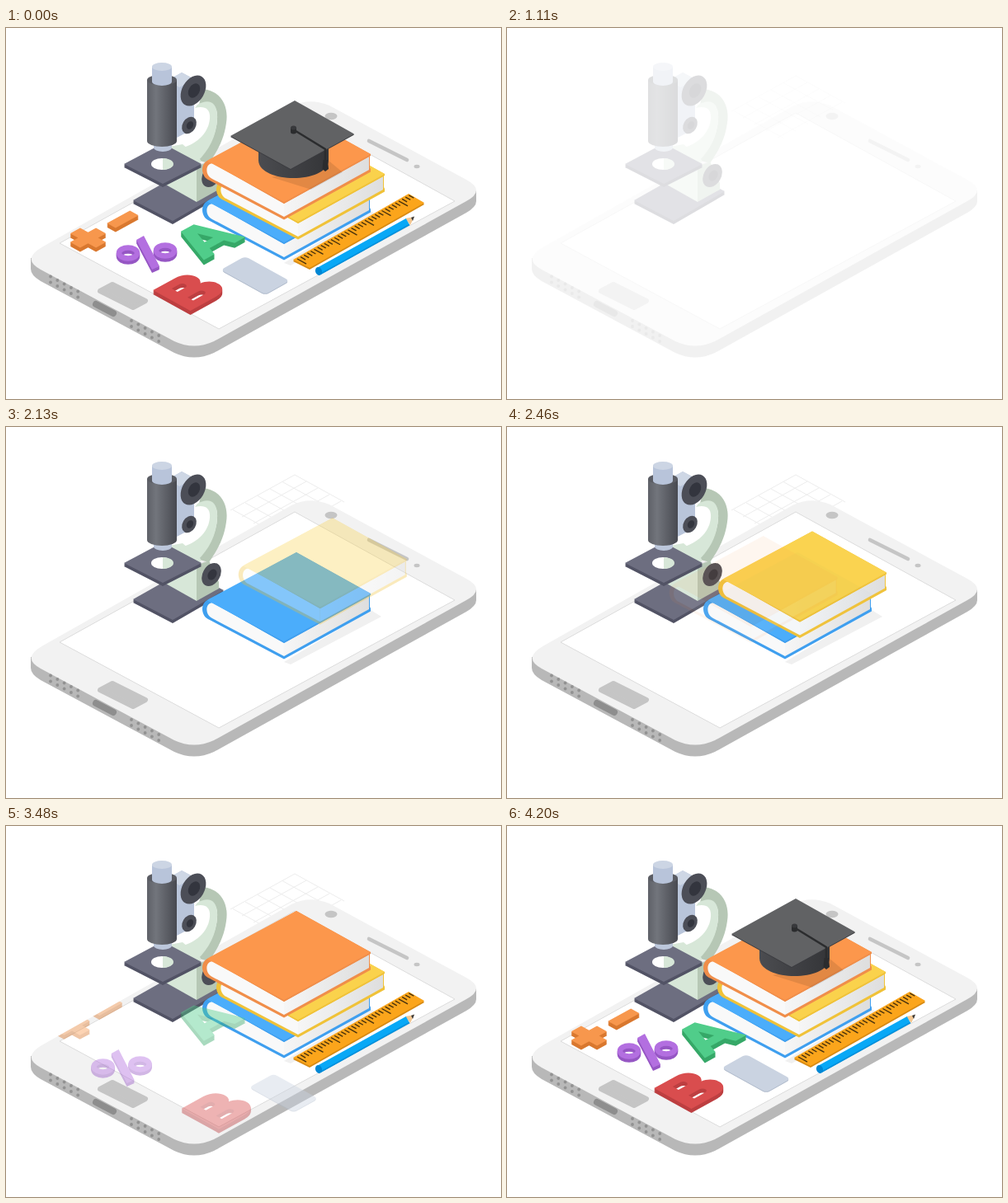
Recreate the animation shown at these times as an HTML page. Size 600 px wide and 450 px high, loop 4.23 s.

```html
<!DOCTYPE html>
<html lang="en">
<head>
<meta charset="utf-8">
<title>Learning on a phone</title>
<style>
  html, body { margin: 0; width: 100%; height: 100%; overflow: hidden; background: #fff; }
  svg { display: block; width: 100vw; height: 100vh; }
</style>
</head>
<body>
<svg id="stage" viewBox="0 0 600 450"></svg>
<script>
const LOOP = 4230;
const ISO = [.87, -.48, .87, .48];
const FACE = 'M45 265 L346 95 Q368 84 392 94 L558 184 Q582 197 558 210 L252 380 Q228 391 204 380 L42 293 Q18 280 45 265Z';

const path = (d, fill, extra = '') => `<path d="${d}" fill="${fill}" ${extra}/>`;
const poly = (points, fill, extra = '') => `<polygon points="${points}" fill="${fill}" ${extra}/>`;
const line = (d, color, width, extra = '') =>
  `<path d="${d}" fill="none" stroke="${color}" stroke-width="${width}" ${extra}/>`;
const oval = (x, y, rx, ry, fill, turn = 0) =>
  `<ellipse cx="${x}" cy="${y}" rx="${rx}" ry="${ry}" fill="${fill}" transform="rotate(${turn} ${x} ${y})"/>`;
const range = (n, fn) => Array.from({ length: n }, (_, i) => fn(i)).join('');
const at = (x, y, body) => `<g transform="translate(${x} ${y})">${body}</g>`;
const flat = (x, y, body) => `<g transform="matrix(${ISO} ${x} ${y})">${body}</g>`;

// Stacks copies of a shape downwards to give it depth.
const solid = (depth, side, top, shape) =>
  range(depth, i => at(0, depth - i, shape(side))) + shape(top);
const block = (x, y, d, depth, side, top) =>
  solid(depth, side, top, c => flat(x, y, path(d, c, 'fill-rule="evenodd"')));

function grid() {
  return line(
    range(5, k => `M${350 + 14 * k} ${58 + 8 * k} l-78 43`) +
    range(6, k => `M${350 - 15 * k} ${58 + 8.5 * k} l60 33`), '#ededed', 1);
}

function phone() {
  const holes = (x, y) => range(10, i => {
    const col = i % 5, row = i < 5 ? 0 : 7;
    return oval(x + col * 8.3, y + col * 4.5 + row, 1.9, 2.1, '#929292');
  });
  return path('M30 279 V292 Q30 300 42 307 L204 394 Q228 405 252 394 L558 224 Q570 217 570 210 V197Z', '#b8b8b8') +
    path(FACE, '#f2f2f2') +
    poly('65,261 350,103 544,210 258,365', '#fff', 'stroke="#dcdcdc" stroke-width="1"') +
    poly('114,319 129,311 169,331 154,339', '#c5c5c5', 'stroke="#c5c5c5" stroke-width="6" stroke-linejoin="round"') +
    oval(394, 107, 7.5, 4.2, '#c5c5c5') +
    line('M440 137 L486 160', '#c5c5c5', 4.6, 'stroke-linecap="round"') +
    oval(498, 168, 3.5, 2.2, '#c5c5c5') +
    line('M109 335 L130 346', '#8e8e8e', 8, 'stroke-linecap="round"') +
    holes(54, 301.5) + holes(152, 355);
}

function microscope() {
  const slab = (points, depth) => solid(depth, '#525365', '#6d6e80', c => poly(points, c));
  const knob = (x, y, rx, ry) =>
    oval(x, y, rx, ry, '#4c4e57', 30) + oval(x + 1, y, rx * .48, ry * .46, '#33353e', 30);
  return slab('154,209 216,174 264,198 202,234', 4) +
    path('M238 74 C262 76 270 96 267 115 C264 138 254 152 246 164 L231 160 C246 146 255 130 256 110 C257 94 248 86 234 93Z', '#b6c7b5') +
    path('M232 93 C248 84 257 92 256 110 C255 132 246 148 232 162 L212 146 C234 140 246 125 247 110 C248 98 241 94 229 97Z', '#d7e7d8') +
    poly('192,145 214,141 236,160 231,211 192,189', '#d7e7d8') +
    poly('231,168 246,162 258,188 258,196 231,211', '#b6c7b5') +
    knob(249, 179, 10.5, 15) +
    slab('143,165 190,140 237,165 190,189', 4) +
    oval(189, 165, 13, 7, '#fff') +
    path('M190 158 A13 7 0 0 1 190 172 Z', '#d7e7d8') +
    poly('197,63 213,54 228,62 228,122 207,133 197,128', '#b9c5da') +
    poly('197,63 213,54 228,62 210,72', '#ced7e5') +
    path('M179 138 V145 A11 5 0 0 0 201 145 V138Z', '#bcc7db') +
    path('M171 63 V137 A18 7 0 0 0 207 137 V63Z', 'url(#tube)') +
    oval(189, 63, 18, 6.5, '#5b5d64') +
    path('M177 47 V65 A12 5 0 0 0 201 65 V47Z', '#b8c4da') +
    oval(189, 47, 12, 5, '#ccd5e4') +
    knob(227, 76, 13.5, 20) + knob(222, 118, 8, 11);
}

function book(x, y, top, side) {
  return at(x, y,
    path('M-90 -51 C-102 -49 -102 -30 -90 -26 L0 21.500 L105 -36.500 V-40 L104 -42 V-57 L0 0Z', side) +
    path('M-86 -47 C-96 -47 -96 -32 -87 -28 L0 18 V2Z', '#f9f9f9') +
    poly('0,2 103,-55 103,-39 0,18', 'url(#pages)') +
    path('M0 0 L105 -58 L15 -108 L-90 -51 Q-96 -49 -97 -42 Q-94 -47 -87 -47 L0 2 L105 -56 V-58Z', side) +
    path('M0 0 L105 -58 L15 -108 L-90 -52 Q-95 -49 -92 -49Z', top));
}

function ruler() {
  const ticks = range(34, i => {
    const len = i % 5 ? 6 : 11;
    return `M${353 + i * 4.1} ${280 - i * 2.34} l${len} ${len * .56}`;
  });
  return solid(2, '#d88a12', '#fba51b', c => poly('348,281 488,201 507,212 368,291', c)) +
    line(ticks, '#4a330d', 1.4);
}

function pencil() {
  return poly('484,231 495,229 490,239', '#f3c792') +
    poly('491,230 495,228.500 493,234', '#3c3c3c') +
    line('M379 295 L487 235', '#08a8f6', 9) +
    line('M381 298.500 L489 238.500', '#0090dc', 1.6) +
    oval(379, 295, 4, 5, '#0087d4', -20);
}

const PLUS = 'M-18 -7 H-7 V-18 H7 V-7 H18 V7 H7 V18 H-7 V7 H-18Z';
const MINUS = 'M-16 -6 H16 V6 H-16Z';
const LETTER_A = 'M-29 0 L-9 -52 H9 L29 0 H14 L10 -11 H-10 L-14 0Z M-6 -22 H6 L0 -38Z';
const LETTER_B = 'M0 0 V-52 H30 C49 -52 51 -33 41 -28 C60 -25 57 0 36 0Z' +
  'M15 -11 H30 C36 -11 36 -19 30 -19 H15Z M15 -33 H26 C31 -33 31 -41 26 -41 H15Z';

function percent() {
  const ring = (x, y, c) =>
    `<ellipse cx="${x}" cy="${y}" rx="11" ry="6.500" fill="none" stroke="${c}" stroke-width="6.500"/>`;
  return solid(4, '#9657c4', '#b36fe0', c =>
    ring(148, 273, c) + ring(193, 270, c) + poly('158,257 167,252 186,289 177,293', c));
}

function tile() {
  return solid(1, '#aeb9ca', '#cad3e1', c =>
    flat(302, 300, `<rect x="-17" y="-31" width="34" height="62" rx="5" fill="${c}"/>`));
}

function cap() {
  return poly('322,181 370,196 408,175 390,160', '#000', 'opacity=".1"') +
    path('M306 140 V161 C308 189 389 189 391 161 V140Z', 'url(#head)') +
    solid(1, '#3a3b3f', '#616264', c => poly('272,131 350,88 422,128.500 345,171', c)) +
    line('M348 123 L387 147 V164', '#2b2c2e', 2.5) +
    poly('384.500,160 390,160 391,171 387,174 383.500,171', '#2b2c2e') +
    path('M345 121 V126 A3.500 2.500 0 0 0 352 126 V121Z', '#2b2c2e') +
    oval(348.5, 121, 3.5, 2.5, '#38393c');
}

const shadow = poly('337,285 345,288 455,230 442,222', '#f0f0f0');

// Each part: markup, start time, starting offset, optional clip.
const SLIDE = 500;
const parts = [
  [shadow + book(337, 260, '#4badfb', '#3f9fef'), 1640, -36, 20],
  [book(354, 235, '#fad24c', '#f0c238'), 2040, 40, -25],
  [book(337, 211, '#fc974c', '#f08e4a'), 2440, -45, 32],
  [ruler(), 2840, 52, 34],
  [pencil(), 2940, 52, 34],
  [block(99.5, 254.5, PLUS, 5, '#d9782f', '#f7974d') + block(141.5, 232, MINUS, 5, '#d9782f', '#f7974d'), 3360, -34, -22, true],
  [percent(), 3360, -53, 33],
  [block(265, 267.5, LETTER_A, 6, '#36a868', '#50cd8a'), 3360, 0, -36],
  [block(223.5, 343, LETTER_B, 5, '#bd3f41', '#d94d4e'), 3360, 60, 43],
  [tile(), 3360, 60, 41],
  [cap(), 3640, 0, -43]
];

const fade = (id, dir, stops) => `<linearGradient id="${id}" ${dir}>` +
  stops.map(([o, c]) => `<stop offset="${o}" stop-color="${c}"/>`).join('') + '</linearGradient>';

const stage = document.getElementById('stage');
stage.innerHTML = '<defs>' +
  fade('tube', '', [[0, '#5f6168'], [.3, '#72757c'], [1, '#484a51']]) +
  fade('pages', '', [[0, '#f6f6f6'], [1, '#dedede']]) +
  fade('head', '', [[0, '#4b4c50'], [1, '#343538']]) +
  `<clipPath id="face"><path d="${FACE}"/></clipPath></defs>` +
  `<g id="scene"><g id="grid">${grid()}</g><g id="base">${phone()}${microscope()}</g>` +
  parts.map(([body, , , , clip]) =>
    `<g ${clip ? 'clip-path="url(#face)"' : ''}><g class="part">${body}</g></g>`).join('') + '</g>';

const scene = document.getElementById('scene');
const gridLines = document.getElementById('grid');
const base = document.getElementById('base');
const movers = [...document.querySelectorAll('.part')];

const clamp = v => Math.min(1, Math.max(0, v));
const easeOut = p => 1 - (1 - p) ** 2;

function draw(t) {
  const leaving = t < 1000;
  scene.setAttribute('opacity', leaving && t >= 60 ? clamp(1 - (t - 30) / 470) : 1);
  const shown = leaving ? 1 : clamp((t - 1010) / 530);
  base.setAttribute('opacity', shown);
  gridLines.setAttribute('opacity', leaving ? 0 : shown * (1 - clamp((t - 3700) / 400)));
  parts.forEach(([, start, dx, dy], i) => {
    const p = leaving ? 1 : easeOut(clamp((t - start) / SLIDE));
    movers[i].setAttribute('opacity', p);
    movers[i].setAttribute('transform', `translate(${dx * (1 - p)} ${dy * (1 - p)})`);
  });
}

const begin = performance.now();
function tick(now) {
  draw(Math.max(0, now - begin) % LOOP);
  requestAnimationFrame(tick);
}
draw(0);
requestAnimationFrame(tick);
</script>
</body>
</html>
```
